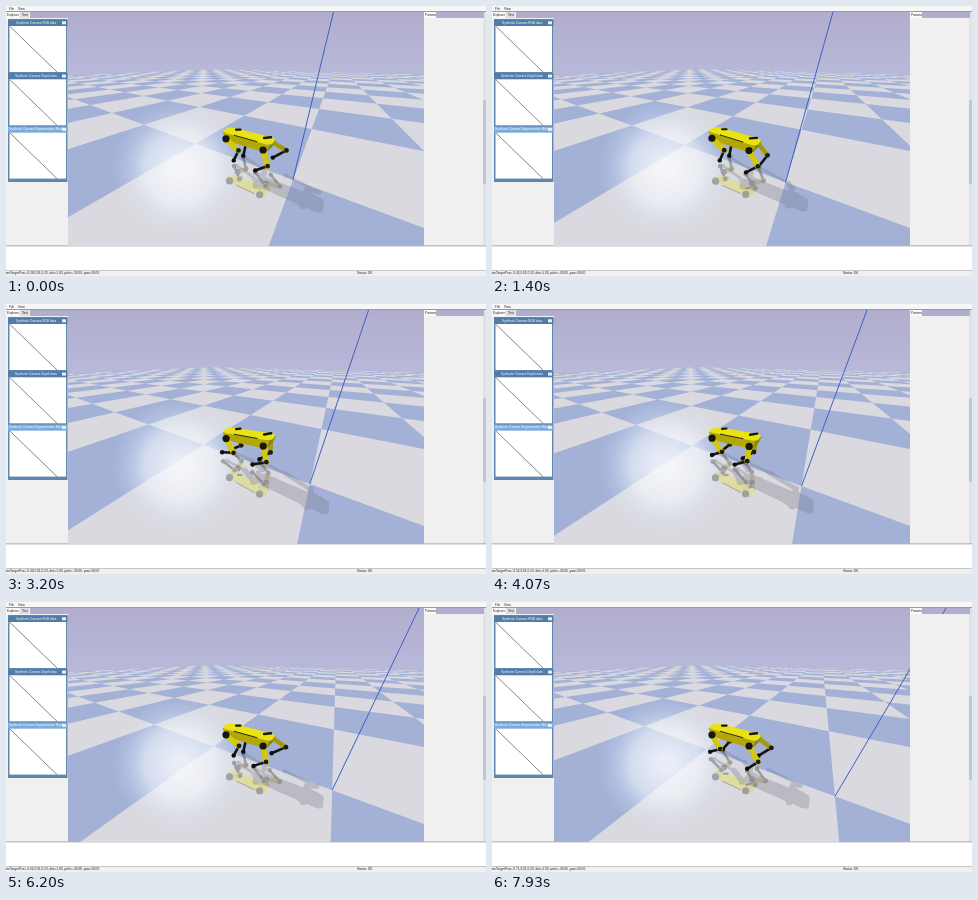
These frames come from a looping animation (480x270 px, 8 s). An HTML page with a canvas:

```html
<!DOCTYPE html>
<html lang="en">
<head>
<meta charset="utf-8">
<title>Quadruped walk</title>
<style>
html, body { margin: 0; width: 100%; height: 100%; overflow: hidden; background: #f0f0f0; }
canvas { position: absolute; left: 0; top: 0; width: 480px; height: 270px; }
span { position: absolute; white-space: pre; font: 3.2px/4px "Liberation Sans", Arial, sans-serif; color: #222; }
i { font-style: normal; }
.title { color: #fff; }
</style>
</head>
<body>
<canvas id="stage" width="480" height="270"></canvas>
<span style="left:3px;top:1px">File</span>
<span style="left:12px;top:1px">View</span>
<span style="left:1px;top:7px">Explorer</span>
<span style="left:16px;top:7px">Test</span>
<span style="left:419px;top:7px">Params</span>
<span class="title" style="left:10px;top:15px">Synthetic Camera RGB data</span>
<span class="title" style="left:9px;top:68px">Synthetic Camera Depth data</span>
<span class="title" style="left:3px;top:121px">Synthetic Camera Segmentation Mask</span>
<span style="left:-2px;top:265px">camTargetPos=<i id="camX">-0.37</i>,0.01,0.23, dist=1.00, pitch=-30.00, yaw=30.00</span>
<span style="left:351px;top:265px">Status: OK</span>
<script>
const ctx = document.getElementById('stage').getContext('2d');
const layer = document.createElement('canvas');
layer.width = 480;
layer.height = 270;
const lctx = layer.getContext('2d');
const camText = document.getElementById('camX');

const LOOP = 8000, STEP = 200 / 3;
const FOCAL = 135, CX = 240, CY = 135;
const SIN = 0.5, COS = Math.sqrt(3) / 2;
const PIVOT_Y = -0.03, PIVOT_Z = 0.23, NEAR = 0.05;
let pivotX = 0;

// Camera: yaw 30, pitch -30, one metre from the pivot.
function toView([x, y, z]) {
  const dx = x - pivotX, dy = y - PIVOT_Y, dz = z - PIVOT_Z;
  const ahead = -SIN * dx + COS * dy;
  return [COS * dx + SIN * dy, SIN * ahead + COS * dz, 1 + COS * ahead - SIN * dz];
}
const toScreen = ([a, u, d]) => [CX + FOCAL * a / d, CY - FOCAL * u / d];
const project = p => toScreen(toView(p));

function clipNear(pts) {
  const out = [];
  pts.forEach((p, i) => {
    const q = pts[(i + 1) % pts.length];
    if (p[2] >= NEAR) out.push(p);
    if ((p[2] >= NEAR) !== (q[2] >= NEAR)) {
      const k = (NEAR - p[2]) / (q[2] - p[2]);
      out.push(p.map((v, j) => v + (q[j] - v) * k));
    }
  });
  return out;
}

function addPath(c, pts) {
  pts.forEach((p, i) => i ? c.lineTo(p[0], p[1]) : c.moveTo(p[0], p[1]));
  c.closePath();
}

function addGround(x, y, size) {
  const corners = [[x, y, 0], [x + size, y, 0], [x + size, y + size, 0], [x, y + size, 0]];
  const pts = clipNear(corners.map(toView));
  if (pts.length > 2) addPath(ctx, pts.map(toScreen));
}

function drawGround() {
  ctx.fillStyle = '#a3b1d6';
  ctx.beginPath();
  addGround(-15, -15, 30);
  ctx.fill();
  ctx.fillStyle = '#dad9df';
  ctx.beginPath();
  for (let x = -15; x < 15; x++) {
    for (let y = -3; y < 15; y++) {
      if ((x + y) % 2 === 0) addGround(x, y, 1);
    }
  }
  ctx.fill();
}

function drawGlow() {
  const g = ctx.createRadialGradient(174, 162, 8, 174, 162, 68);
  g.addColorStop(0, 'rgba(250,252,255,.8)');
  g.addColorStop(0.45, 'rgba(244,248,255,.6)');
  g.addColorStop(0.75, 'rgba(225,238,255,.22)');
  g.addColorStop(1, 'rgba(215,230,255,0)');
  ctx.fillStyle = g;
  ctx.fillRect(62, 80, 190, 160);
}

// Pose: time, body pitch, then x and z of each foot (far front, far rear, near front, near rear).
const POSES = [
  [0, 0, -.08, 0, .19, .08, -.1, .02, .1, 0],
  [1.4, -.03, -.08, 0, .2, 0, -.1, .02, .14, 0],
  [2.13, 0, -.14, 0, .2, .06, -.18, .04, .165, 0],
  [3.2, .1, -.21, 0, .08, 0, -.22, .04, .075, .03],
  [4.93, .06, -.12, 0, .03, 0, -.14, .01, .01, 0],
  [6.2, 0, -.08, 0, .18, .08, -.1, .03, .085, 0],
  [7.93, 0, -.15, 0, .19, .06, -.2, .03, .15, 0]
];

function poseAt(t) {
  let i = 0;
  while (i < POSES.length - 2 && t > POSES[i + 1][0]) i++;
  const a = POSES[i], b = POSES[i + 1];
  const k = Math.min(1, (t - a[0]) / (b[0] - a[0]));
  return a.slice(1).map((v, j) => v + (b[j + 1] - v) * k);
}

function kneeOf(hip, foot) {
  const dx = foot[0] - hip[0], dz = foot[2] - hip[2];
  const len = Math.hypot(dx, dz);
  const bend = Math.sqrt(Math.max(0, 0.132 ** 2 - len * len / 4));
  return [(hip[0] + foot[0]) / 2 - dz / len * bend, (hip[1] + foot[1]) / 2, (hip[2] + foot[2]) / 2 + dx / len * bend];
}

function drawRobot(c, pose, map, flat) {
  const pt = p => project(map([p[0] + pivotX, p[1], p[2]]));
  const tone = color => flat || color;
  const pitch = pose[0];
  const body = (x, y, z) => [x, y, z + pitch * x];

  const face = (color, pts) => {
    c.fillStyle = tone(color);
    c.beginPath();
    addPath(c, pts.map(pt));
    c.fill();
  };
  const limb = (color, width, ...pts) => {
    c.strokeStyle = tone(color);
    c.lineWidth = width;
    c.lineCap = c.lineJoin = 'round';
    c.beginPath();
    pts.map(pt).forEach(p => c.lineTo(p[0], p[1]));
    c.stroke();
  };
  const dot = (color, r, p) => {
    const [x, y] = pt(p);
    c.fillStyle = tone(color);
    c.beginPath();
    c.arc(x, y, r, 0, 2 * Math.PI);
    c.fill();
  };
  const leg = (i, side) => {
    const hip = body(i % 2 ? .155 : -.155, side * .07, .225);
    const foot = [pose[1 + 2 * i], side * .06, pose[2 + 2 * i] + .01];
    const knee = kneeOf(hip, foot);
    const far = side > 0;
    limb('#151510', 2.6, knee, foot);
    limb(far ? '#a39a08' : '#d3c90b', far ? 4.5 : 5.5, hip, knee);
    dot('#1c1b12', 2.4, knee);
    dot('#0c0c0c', 2.2, foot);
    dot('#17170f', far ? 3 : 3.6, hip);
  };

  leg(0, 1);
  leg(1, 1);
  const top = (x, y) => body(x, y, .265), low = (x, y) => body(x, y, .195);
  face('#b3a708', [top(-.2, -.05), top(.19, -.05), low(.17, -.05), low(-.18, -.05)]);
  face('#8c8408', [top(.19, -.05), top(.2, .05), low(.18, .05), low(.17, -.05)]);
  face('#e9e313', [top(-.21, -.035), top(-.17, -.055), top(.17, -.055), top(.2, -.035),
    top(.2, .035), top(.17, .055), top(-.17, .055), top(-.21, .035)]);
  limb('#29270f', 1, top(-.09, -.053), top(.1, -.053));
  limb('#1a190f', 2.4, top(.12, .02), top(.16, .055));
  limb('#1a190f', 2.2, top(-.13, .035), top(-.1, .055));
  leg(2, -1);
  leg(3, -1);
}

function drawLayer(pose, map, color, alpha) {
  lctx.clearRect(0, 0, 480, 270);
  drawRobot(lctx, pose, map, color);
  ctx.globalAlpha = alpha;
  ctx.drawImage(layer, 0, 0);
  ctx.globalAlpha = 1;
}

function drawScene(pose) {
  ctx.save();
  ctx.beginPath();
  ctx.rect(62, 6, 356, 234);
  ctx.rect(24, 6, 38, 6);
  ctx.rect(430, 6, 48, 6);
  ctx.clip();
  const sky = ctx.createLinearGradient(0, 6, 0, 66);
  sky.addColorStop(0, '#b1adcd');
  sky.addColorStop(1, '#b8b8d9');
  ctx.fillStyle = sky;
  ctx.fillRect(0, 0, 480, 270);
  drawGround();
  drawGlow();
  drawLayer(pose, ([x, y, z]) => [x, y, -z], null, .3);
  drawLayer(pose, ([x, y, z]) => [x + 1.43 * z, y - .48 * z, 0], '#77798a', .32);

  ctx.strokeStyle = '#3f5fc4';
  ctx.lineWidth = 1;
  ctx.beginPath();
  ctx.moveTo(...project([0, 0, 0]));
  ctx.lineTo(...project([0, 0, 1]));
  ctx.stroke();
  drawRobot(ctx, pose, p => p, null);
  ctx.restore();
}

function box(color, x, y, w, h) {
  ctx.fillStyle = color;
  ctx.fillRect(x, y, w, h);
}

function drawPanels() {
  box('#f0f0f0', 0, 0, 480, 270);
  box('#f7f7f8', 0, 0, 480, 5);
  box('#8f9bb5', 0, 5, 480, 1);
  box('#fafafa', 0, 6, 13, 6);
  box('#dedee2', 14, 6, 9, 6);
  box('#fafafa', 418, 6, 12, 6);
  box('#e2e2e4', 477, 6, 3, 234);
  box('#c3c6cc', 477, 94, 3, 84);
  box('#ffffff', 0, 240, 480, 24);
  box('#9a9aa0', 0, 239.5, 480, .8);
  box('#b5b5b8', 0, 264, 480, .7);

  box('#5f87ad', 2, 13, 59.5, 163);
  for (let i = 0; i < 3; i++) {
    const y = 14 + i * 53.3;
    box(i === 2 ? '#78acdf' : '#527ca8', 2, y, 59.5, 6);
    box('#e5edf4', 56, y + 1.3, 4, 3);
    box('#ffffff', 3.5, y + 6, 56.5, 46);
    ctx.strokeStyle = '#555';
    ctx.lineWidth = .7;
    ctx.beginPath();
    ctx.moveTo(4, y + 6.5);
    ctx.lineTo(51, y + 52);
    ctx.stroke();
  }
}

function render(now) {
  let step = Math.floor((now % LOOP + 4) / STEP);
  // Two short stalls in the playback.
  if (step === 6) step = 5;
  if (step === 89 || step === 90) step = 88;
  const t = Math.min(step, 119) * STEP / 1000;
  pivotX = -(.375 + .0305 * t + .00152 * t * t);
  drawPanels();
  drawScene(poseAt(t));
  camText.textContent = pivotX.toFixed(2);
}

const start = performance.now();
function tick() {
  render(performance.now() - start);
  requestAnimationFrame(tick);
}
tick();
</script>
</body>
</html>
```
